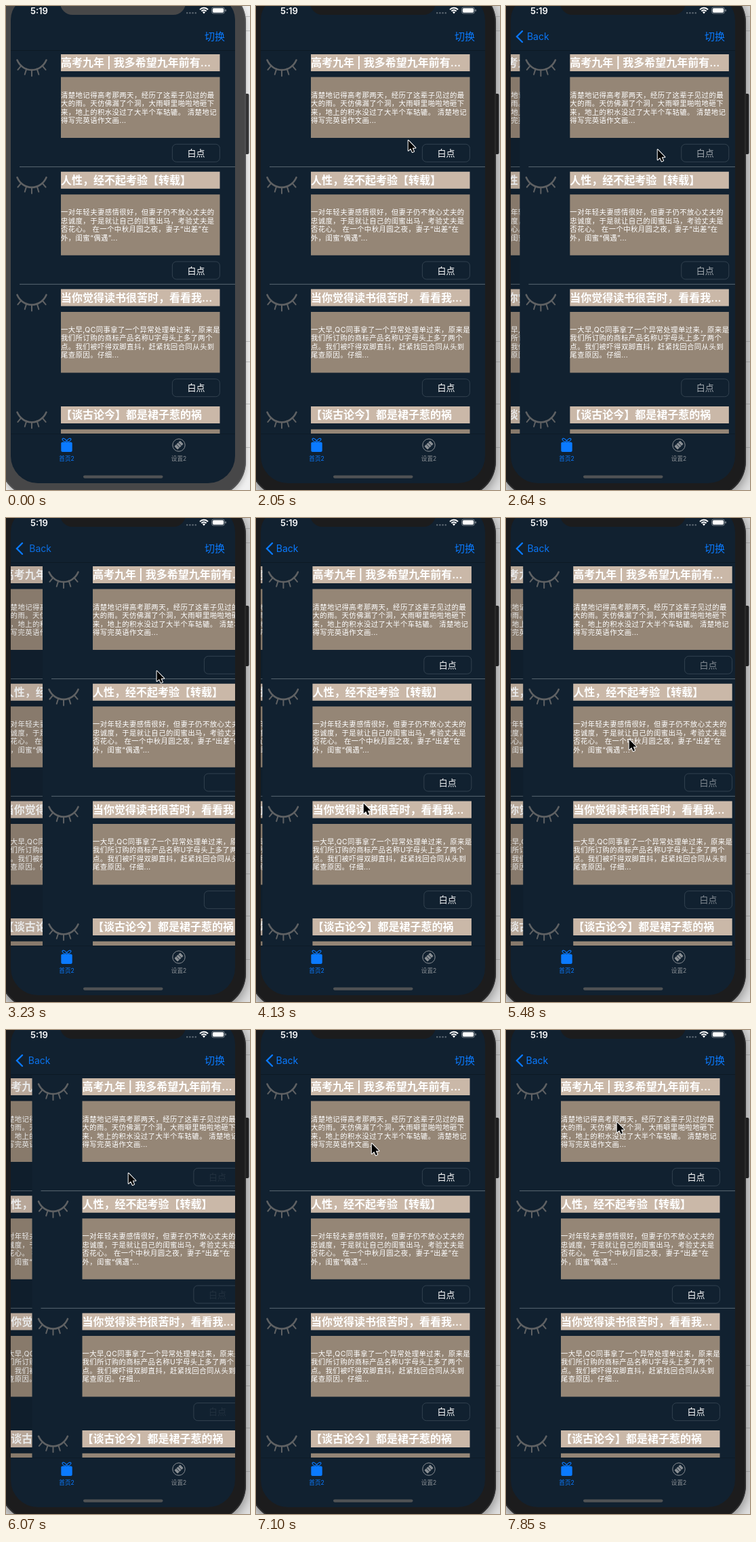
These frames come from a looping animation (360x712 px, 8 s). An HTML page with a canvas:

```html
<!DOCTYPE html>
<html lang="zh-CN">
<head>
<meta charset="utf-8">
<title>列表页转场</title>
<style>
html, body { margin: 0; width: 100%; height: 100%; overflow: hidden; background: #eee; }
canvas { display: block; width: 360px; height: 712px; }
</style>
</head>
<body>
<canvas id="stage"></canvas>
<script>
const W = 360, H = 712, LOOP = 8000;
const LEFT = 7, RIGHT = 338, SCREEN = RIGHT - LEFT;
const LIST_TOP = 66, LIST_BOTTOM = 629, ROW = 172.7;
const FONT = 'Inter, "Noto Sans CJK SC", "Noto Sans CJK", "Noto Sans", sans-serif';
const NAVY = '#112130', BLUE = '#0a7aff', GREY = '#8b9095';

const rows = [
  ['高考九年 | 我多希望九年前有...', [
    '清楚地记得高考那两天，经历了这辈子见过的最',
    '大的雨。天仿佛漏了个洞，大雨噼里啪啦地砸下',
    '来，地上的积水没过了大半个车轱辘。 清楚地记',
    '得写完英语作文画...']],
  ['人性，经不起考验【转载】', [
    '一对年轻夫妻感情很好，但妻子仍不放心丈夫的',
    '忠诚度，于是就让自己的闺蜜出马，考验丈夫是',
    '否花心。 在一个中秋月圆之夜，妻子“出差”在',
    '外，闺蜜“偶遇”...']],
  ['当你觉得读书很苦时，看看我...', [
    '一大早,QC同事拿了一个异常处理单过来，原来是',
    '我们所订购的商标产品名称U字母头上多了两个',
    '点。我们被吓得双脚直抖，赶紧找回合同从头到',
    '尾查原因。仔细...']],
  ['【谈古论今】都是裙子惹的祸', []]
];

// Pointer path: [ms, x, y]
const path = [
  [120, 176, 32], [420, 176, 41], [1010, 176, 41], [1310, 281, 64],
  [1600, 281, 64], [1750, 294, 53], [2050, 224, 197], [3240, 222, 224],
  [4134, 158, 419], [5472, 181, 325], [6066, 180, 210], [7850, 163, 135]
];
// Each tap on a row pushes the same list again.
const taps = [2290, 2996, 3634, 4370, 5141, 5784, 6450, 7110];
const SPRING = 0.014;
const FIRST = 2350, STEP = 148.65;

const canvas = document.getElementById('stage');
const c = canvas.getContext('2d');
const dpr = window.devicePixelRatio || 1;
canvas.width = W * dpr;
canvas.height = H * dpr;

const clamp = v => Math.max(0, Math.min(1, v));

function box(x, y, w, h, r, fill) {
  c.beginPath();
  c.roundRect(x, y, w, h, r);
  if (fill) { c.fillStyle = fill; c.fill(); }
}

function stroke(color, width) {
  c.strokeStyle = color;
  c.lineWidth = width;
  c.stroke();
}

function line(points, color, width) {
  c.beginPath();
  points.forEach(([x, y]) => c.lineTo(x, y));
  stroke(color, width);
}

// Places text by the middle of its ideographs.
function text(str, x, y, size, color, weight = 400, align = 'left') {
  c.font = `${weight} ${size}px ${FONT}`;
  c.textAlign = align;
  c.fillStyle = color;
  c.fillText(str, x, y + size * 0.37);
}

function lash(y) {
  const color = '#5f6163';
  c.lineCap = 'round';
  c.beginPath();
  c.moveTo(16.5, y + 79.5);
  c.bezierCurveTo(25, y + 99, 51, y + 99, 59.5, y + 79.5);
  stroke(color, 2.6);
  for (const k of [-2, -1, 0, 1, 2]) {
    const x = 38 + k * 7.7, top = y + 94 - k * k * 1.6;
    line([[x, top], [x + k * 2.6, top + 9 - k * k * 0.7]], color, 2);
  }
  c.lineCap = 'butt';
}

function page(shift, labelAlpha) {
  c.save();
  c.translate(shift, 0);
  c.fillStyle = NAVY;
  c.fillRect(LEFT, LIST_TOP, SCREEN, LIST_BOTTOM - LIST_TOP);
  rows.forEach(([title, body], i) => {
    const y = i * ROW;
    lash(y);
    box(81, y + 71, 234.5, 25, 0, '#cab8a8');
    text(title, 81, y + 83.4, 16, '#fff', 600);
    box(81, y + 104.6, 234.5, 89.5, 0, '#958676');
    c.letterSpacing = '0.4px';
    body.forEach((s, n) => text(s, 81, y + 130.7 + n * 12.5, 10.4, '#fff'));
    c.letterSpacing = '0px';
    box(245.4, y + 203.3, 70, 26, 6);
    stroke('#364653', 0.9);
    c.globalAlpha = labelAlpha;
    text('白点', 280.4, y + 216, 13, '#fff', 400, 'center');
    c.globalAlpha = 1;
    if (i < 2) line([[20, y + 236.6], [RIGHT, y + 236.6]], '#63707a', 0.9);
  });
  c.restore();
}

function list(off) {
  c.save();
  c.beginPath();
  c.rect(LEFT, LIST_TOP, SCREEN, LIST_BOTTOM - LIST_TOP);
  c.clip();
  const done = 1 - off / SCREEN;
  if (off > 0) {
    page(-0.3 * SCREEN * done, 1);
    c.fillStyle = `rgba(0,0,0,${0.1 * done})`;
    c.fillRect(LEFT, LIST_TOP, off, LIST_BOTTOM - LIST_TOP);
  }
  page(off, clamp(1 - off / 34));
  c.restore();
}

function desktop(active) {
  c.fillStyle = active ? '#e4e4e4' : '#f0f0f0';
  c.fillRect(0, 0, W, H);
  for (const y of [15, 36, 493, 523, 585, 649]) {
    line([[340, y + 0.5], [W, y + 0.5]], '#c2c2c2', 1);
  }
}

function phone(active) {
  const shell = active ? '#1c1c1d' : '#474748';
  box(351, 129, 7.5, 89, 2, active ? '#29292a' : '#39393a');
  c.save();
  c.shadowColor = `rgba(0,0,0,${active ? 0.5 : 0.25})`;
  c.shadowBlur = (active ? 20 : 9) * dpr;
  c.shadowOffsetY = 3 * dpr;
  box(-9, -28, 363, 750, 52, shell);
  c.restore();
  box(-8, -27, 361, 748, 51);
  stroke(active ? '#303031' : '#565657', 1.5);
  box(LEFT, -13, SCREEN, 715, [33, 33, 40, 40], NAVY);
  box(80, -20, 185, 33, [0, 0, 18, 18], shell);
}

function statusBar() {
  text('5:19', 36, 7.2, 13, '#fff', 600);
  for (let i = 0; i < 4; i++) box(266 + i * 4.2, 9, 2.4, 2.4, 1.2, '#5c6872');
  const from = -Math.PI * 0.76, to = -Math.PI * 0.24;
  for (const r of [4.9, 8.2]) {
    c.beginPath();
    c.arc(292, 11, r, from, to);
    stroke('#fff', 2);
  }
  c.beginPath();
  c.moveTo(292, 11.5);
  c.arc(292, 11, 2.8, from, to);
  c.fillStyle = '#fff';
  c.fill();
  box(303.5, 2, 19, 9, 2.6);
  stroke('#8d969d', 0.8);
  box(304.8, 3.3, 16.4, 6.4, 1.6, '#fff');
  box(323.4, 5, 1.4, 3, 0.7, '#8d969d');
}

function navBar(off, pushes) {
  text('切换', 293, 44.3, 15, BLUE);
  line([[LEFT, 65.5], [RIGHT, 65.5]], '#0c1924', 1);
  if (!pushes) return;
  const fade = clamp(1 - off / SCREEN);
  c.globalAlpha = pushes > 1 ? 1 : fade;
  c.lineCap = 'round';
  line([[24, 37], [16, 45], [24, 53]], BLUE, 2.4);
  c.lineCap = 'butt';
  c.globalAlpha = fade;
  text('Back', 29.6 + off * 0.1, 44.6, 14, BLUE);
  c.globalAlpha = 1;
}

function tabBar() {
  line([[LEFT, 629.5], [RIGHT, 629.5]], '#0d1a26', 0.8);
  // Gift
  for (const s of [-1, 1]) {
    c.beginPath();
    c.ellipse(89.5 + s * 3.4, 638.6, 3.4, 1.8, s * -0.6, 0, Math.PI * 2);
    stroke(BLUE, 1.1);
  }
  box(81.3, 641.5, 16.4, 14.5, 2, BLUE);
  text('首页2', 89.5, 665.5, 8.6, BLUE, 400, 'center');
  // Ticket
  c.beginPath();
  c.arc(255, 646, 9.2, 0, Math.PI * 2);
  stroke(GREY, 1);
  c.save();
  c.translate(255, 646);
  c.rotate(-0.75);
  box(-6, -3.4, 12, 6.8, 1, GREY);
  for (const x of [-1.8, 2]) line([[x, -3.4], [x, 3.4]], NAVY, 0.9);
  c.restore();
  text('设置2', 255, 665.5, 8.6, GREY, 400, 'center');
  box(114, 690.5, 117.5, 4.2, 2.1, '#505254');
}

function pointer([x, y]) {
  const shape = [[0, 0], [0, 15], [3.5, 11.8], [6, 17.3], [8.4, 16.2], [6, 10.9], [10.7, 10.9]];
  c.beginPath();
  shape.forEach(([dx, dy]) => c.lineTo(x + 0.7 + dx, y + 0.7 + dy));
  c.closePath();
  c.lineJoin = 'round';
  stroke('#fff', 2);
  c.fillStyle = '#000';
  c.fill();
  c.lineJoin = 'miter';
}

const stepped = t => FIRST + Math.floor((t - FIRST) / STEP + 0.15) * STEP;

function pointerAt(t) {
  const i = path.findIndex(p => p[0] > t);
  if (i < 0) return path[path.length - 1].slice(1);
  const a = path[Math.max(0, i - 1)], b = path[i];
  const u = clamp((t - a[0]) / (b[0] - a[0]));
  return [a[1] + (b[1] - a[1]) * u, a[2] + (b[2] - a[2]) * u];
}

// Critically damped slide of the newest page.
function offsetAt(age) {
  const x = age * SPRING;
  const off = SCREEN * (1 + x) * Math.exp(-x);
  return off < 0.4 ? 0 : off;
}

function draw(t) {
  const time = stepped(t);
  const past = taps.filter(tap => tap <= time);
  const off = past.length ? offsetAt(time - past[past.length - 1]) : 0;
  const active = t >= 860;
  c.setTransform(dpr, 0, 0, dpr, 0, 0);
  desktop(active);
  phone(active);
  list(off);
  statusBar();
  navBar(off, past.length);
  tabBar();
  if (t >= 140) pointer(pointerAt(time));
}

let start = null;
function tick(now) {
  if (start === null) start = now;
  draw((now - start) % LOOP);
  requestAnimationFrame(tick);
}
draw(0);
requestAnimationFrame(tick);
</script>
</body>
</html>
```
